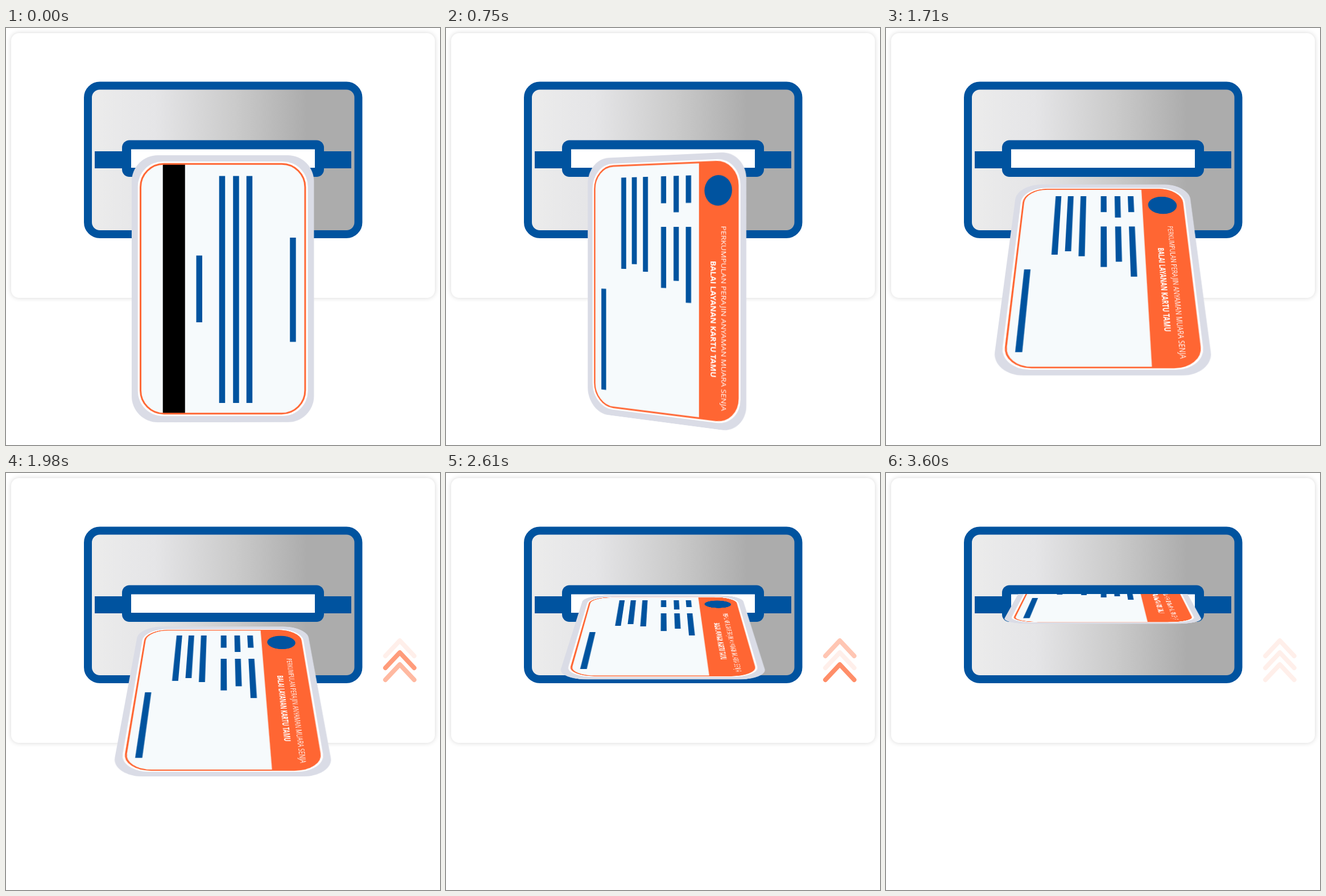
Animation of 763x734 px, one loop 4.5 s. Source, as an HTML page:

```html
<!DOCTYPE html>
<html lang="id">
<head>
<meta charset="utf-8">
<title>Card insertion</title>
<style>
  html, body { margin: 0; width: 100%; height: 100%; overflow: hidden; background: #fff; }
  #stage { position: relative; width: 763px; height: 734px; overflow: hidden; }
  #stage > * { position: absolute; }
  #panel { left: 9px; top: 9px; width: 745px; height: 466px; border-radius: 14px;
           box-shadow: 0 0 8px rgba(0, 0, 0, .16); }
  /* The view starts at the slot's inner top edge, so the card disappears behind it. */
  #view { left: 0; top: 213px; width: 763px; height: 521px; overflow: hidden;
          perspective: 1500px; perspective-origin: 381.5px 135px; }
  #card { position: absolute; left: 221.25px; top: 10.5px; width: 320.5px; height: 470px;
          transform-origin: 50% 124.5px; transform-style: preserve-3d; }
  #card svg { position: absolute; left: 0; top: 0; width: 100%; height: 100%; backface-visibility: hidden; }
  #back { transform: rotateY(180deg); }
  .blue { fill: #00539f; }
  .bars { stroke: #00539f; stroke-width: 10.5; fill: none; }
  text { font: 13.5px "Open Sans", sans-serif; fill: #fff; text-anchor: middle; }
</style>
</head>
<body>
<div id="stage">
  <div id="panel"></div>
  <svg width="763" height="734">
    <defs>
      <linearGradient id="metal">
        <stop stop-color="#ececec"/>
        <stop offset=".25" stop-color="#e5e5e7"/>
        <stop offset=".55" stop-color="#cacaca"/>
        <stop offset=".81" stop-color="#acacac"/>
      </linearGradient>
    </defs>
    <rect x="144" y="101.5" width="475.5" height="261.5" rx="21" fill="url(#metal)" stroke="#00539f" stroke-width="14"/>
    <rect class="blue" x="156" y="217" width="451" height="30"/>
    <rect class="blue" x="204" y="197.5" width="355" height="64.5" rx="13"/>
    <rect x="220" y="213.5" width="323" height="32.5" fill="#fff"/>
    <g id="arrows" fill="none" stroke="#f63" stroke-width="8" stroke-linecap="round" stroke-linejoin="round">
      <path d="M667 364l25.3-27 25.3 27"/>
      <path d="M667 343l25.3-27 25.3 27"/>
      <path d="M667 322l25.3-27 25.3 27"/>
    </g>
  </svg>
  <div id="view">
    <div id="card">
      <svg id="back" viewBox="-160.25 -235 320.5 470">
        <g id="base">
          <rect x="-160.25" y="-235" width="320.5" height="470" rx="46" fill="#dadce6"/>
          <rect x="-149.5" y="-224" width="299" height="448" rx="44" fill="#fff"/>
          <rect x="-144.7" y="-219.7" width="289.4" height="439.4" rx="41" fill="#f6fafc"/>
        </g>
        <path d="M-105.5-219.5h39v439h-39z"/>
        <path class="bars" d="M-41.5-58.5V59M-1.3-198.5V201M23.2-198.5V201M46.7-198.5V201M123.2-90V93.5"/>
        <rect id="rim" x="-144.7" y="-219.7" width="289.4" height="439.4" rx="41" fill="none" stroke="#f63" stroke-width="3"/>
      </svg>
      <svg id="front" viewBox="-160.25 -235 320.5 470">
        <use href="#base"/>
        <path d="M71.5-219.7H103.7a41 41 0 0 1 41 41V178.7a41 41 0 0 1-41 41H71.5z" fill="#f63"/>
        <use href="#rim"/>
        <path class="bars" d="M51-198v47.5M26.8-198v63.5M1.5-198v47.5M51-109V22.5M26.8-109V-14.7M1.5-109V-1.6
          M-81.5-198V-33M-59-198V-42M-35.7-198V-29M-124.8 4.5V189.5"/>
        <circle class="blue" cx="108" cy="-171" r="26"/>
        <g transform="rotate(90)">
          <text x="46" y="-113.5">PERKUMPULAN PERAJIN ANYAMAN MUARA SENJA</text>
          <text x="48" y="-94" font-weight="700" style="font-weight:700">BALAI LAYANAN KARTU TAMU</text>
        </g>
      </svg>
    </div>
  </div>
</div>
<script>
  const LOOP = 4500;
  const card = document.getElementById('card');
  const arrowGroup = document.getElementById('arrows');
  const arrows = [...arrowGroup.children];

  const progress = (t, start, end) => Math.min(1, Math.max(0, (t - start) / (end - start)));

  // Triangular pulse every 900 ms, 300 ms to each side of its peak.
  function pulse(t, firstPeak) {
    const near = Math.min(Math.abs(t - firstPeak), Math.abs(t - firstPeak - 900));
    return 0.1 + 0.9 * Math.max(0, 1 - near / 300);
  }

  function draw(t) {
    const flip = -180 * (1 - progress(t, 0, 900));
    const tilt = 57 * progress(t, 900, 1800) + 18 * progress(t, 1800, 3000);
    const slide = progress(t, 1820, 3000);
    card.style.transform =
      `translate3d(0, ${-164 * slide}px, ${-182 * slide}px) rotateX(${tilt}deg) rotateY(${flip}deg)`;

    arrowGroup.style.visibility = t < 1800 ? 'hidden' : 'visible';
    arrows.forEach((arrow, i) => arrow.style.opacity = pulse(t, 1800 + 300 * i));
  }

  function tick() {
    draw(performance.now() % LOOP);
    requestAnimationFrame(tick);
  }
  tick();
</script>
</body>
</html>
```
